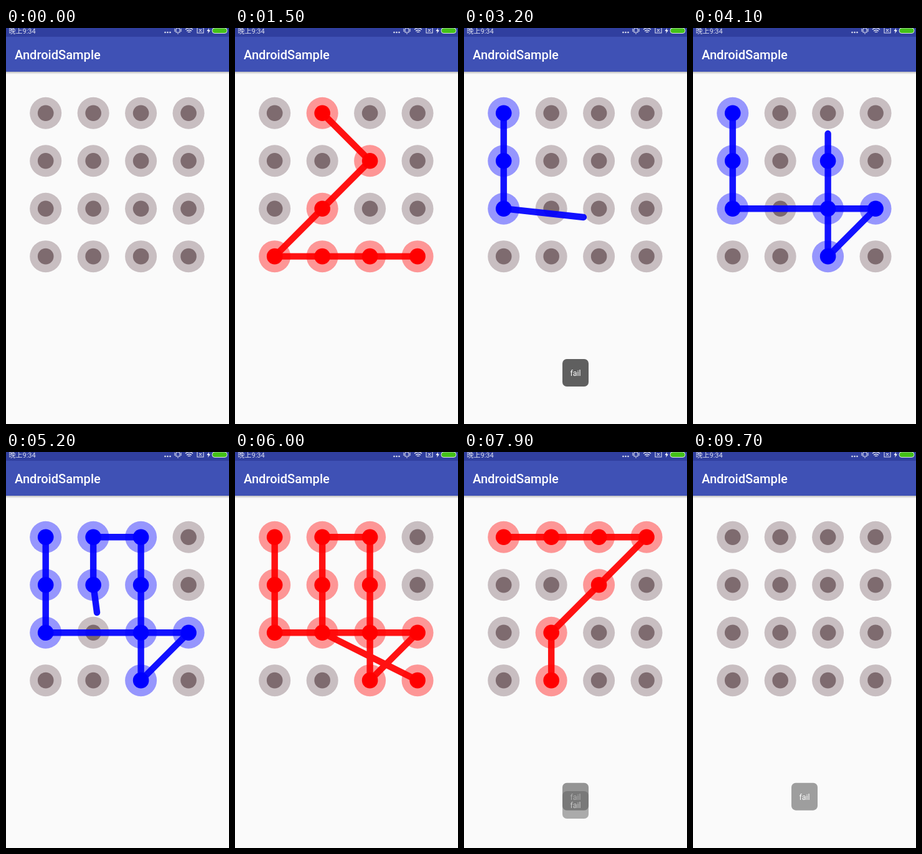
An HTML page for the animation above (9.8 s loop, 358 by 634 pixels).

```html
<!DOCTYPE html>
<html lang="en">
<head>
<meta charset="utf-8">
<title>Pattern lock</title>
<style>
  html, body { margin: 0; height: 100%; overflow: hidden; background: #fafafa; }
  svg { display: block; width: 358px; height: 634px; font-family: Roboto, "Noto Sans CJK SC", "Noto Sans CJK", sans-serif; }
</style>
</head>
<body>
<svg viewBox="0 0 358 634">
  <defs>
    <linearGradient id="shade" x2="0" y2="1">
      <stop stop-color="#000" stop-opacity=".25"/>
      <stop offset="1" stop-color="#000" stop-opacity="0"/>
    </linearGradient>
  </defs>
  <rect width="358" height="634" fill="#fafafa"/>
  <rect y="70" width="358" height="4" fill="url(#shade)"/>
  <rect width="358" height="70" fill="#3f51b5"/>
  <rect width="358" height="14" fill="#303f9f"/>
  <text x="14" y="50" font-size="20.1" font-weight="500" fill="#fff">AndroidSample</text>
  <text x="4.5" y="8.5" font-size="11" fill="#dde0f0">晚上9:34</text>
  <g fill="none" stroke="#dde0f0" stroke-width="1.1">
    <path d="M255.5 7h.01M259.5 7h.01M263.5 7h.01" stroke-width="2.6" stroke-linecap="round"/>
    <path d="M273 7V3q0-3 3-3t3 3v4zM275 9h2M271 1v5M281 1v5"/>
    <path d="M288 2.5q6-5 12 0M290 5q4-3.5 8 0M292 7q2-1.6 4 0" stroke-width="1.3"/>
    <path d="M307 0v8h10V0M310 2l4 4M314 2l-4 4"/>
  </g>
  <path d="M326 0l-3.5 5h2.5l-1 4 4-5.5h-2.5z" fill="#fff"/>
  <rect x="331" y="0" width="24" height="8.5" rx="4" fill="#43c117" stroke="#dde0f0"/>
  <g id="dots"></g>
  <polyline id="trail" fill="none" stroke-width="10.4" stroke-opacity=".93" stroke-linecap="round" stroke-linejoin="round"/>
  <g id="toasts"></g>
</svg>
<script>
const LOOP = 9800, STEP = 100, SIZE = 4, GAP = 76.45, HIT = 0.3;
const TOAST_LIFE = 1812, TOAST_IN = 320, TOAST_OUT = 200;
const RED = { outer: '#fd9696', inner: '#ff0000' };
const BLUE = { outer: '#9696fd', inner: '#0000ff' };
const GREY = { outer: '#c8bec1', inner: '#7e6b6f' };

// Each path holds the turning points of the finger: [time, column, row].
const strokes = [
  { fail: 1500, toast: 1581, end: 2400,
    path: [[1000, 1, 0], [1100, 2, 1], [1250, 0, 3], [1400, 3, 3]] },
  { fail: 6000, toast: 6018, end: 6900,
    path: [[2980, 0, 0], [3100, 0, 2], [3140, .4, 2.45], [3200, 1.677, 2.18], [3300, 2, 2],
      [3500, 3, 2], [3800, 2, 3], [4150, 2, 0], [4200, 1.35, 0], [4500, 1.35, 0], [4700, 1, 0],
      [5200, 1.077, 1.579], [5300, 1, 2], [5500, 2.65, 2.46], [5800, 3, 3]] },
  { fail: 7600, toast: 7806, end: 8600,
    path: [[7180, 0, 0], [7320, 3, 0], [7440, 1, 2], [7500, 1, 3]] }
];

const clamp = v => Math.min(1, Math.max(0, v));
const place = (col, row) => [63.7 + col * GAP, 136.3 + row * GAP];

function add(parent, tag, attrs) {
  const el = document.createElementNS('http://www.w3.org/2000/svg', tag);
  for (const key in attrs) el.setAttribute(key, attrs[key]);
  return parent.appendChild(el);
}

const trail = document.getElementById('trail');
const dotLayer = document.getElementById('dots');
const dots = Array.from({ length: SIZE * SIZE }, (_, i) => {
  const [cx, cy] = place(i % SIZE, Math.floor(i / SIZE));
  return {
    outer: add(dotLayer, 'circle', { cx, cy, r: 25.5 }),
    inner: add(dotLayer, 'circle', { cx, cy, r: 12.8 })
  };
});

for (const stroke of strokes) {
  stroke.box = add(document.getElementById('toasts'), 'g', {});
  add(stroke.box, 'rect', { x: 158, y: 530, width: 42, height: 44, rx: 7, fill: '#5f5f5f' });
  add(stroke.box, 'text', { x: 179, y: 557, 'font-size': 12.5, 'text-anchor': 'middle', fill: '#fff' })
    .textContent = 'fail';
}

function fingerAt(path, t) {
  const next = path.findIndex(point => point[0] > t);
  if (next < 0) return path[path.length - 1].slice(1);
  const [t0, c0, r0] = path[next - 1], [t1, c1, r1] = path[next];
  const k = (t - t0) / (t1 - t0);
  return [c0 + (c1 - c0) * k, r0 + (r1 - r0) * k];
}

// Dots the finger has come close to, in the order of contact.
function touchedDots(path, t) {
  const touched = new Set();
  for (let time = path[0][0]; time <= t; time += 5) {
    const [col, row] = fingerAt(path, time);
    const c = Math.round(col), r = Math.round(row);
    if (Math.hypot(col - c, row - r) < HIT) touched.add(r * SIZE + c);
  }
  return touched;
}

function drawStroke(t) {
  const stroke = strokes.find(s => t >= s.path[0][0] && t < s.end);
  const failed = stroke && t >= stroke.fail;
  const touched = stroke ? touchedDots(stroke.path, Math.min(t, stroke.fail)) : new Set();
  const points = [...touched].map(i => place(i % SIZE, Math.floor(i / SIZE)));
  if (stroke && !failed) points.push(place(...fingerAt(stroke.path, t)));

  const active = failed ? RED : BLUE;
  dots.forEach((dot, i) => {
    const colors = touched.has(i) ? active : GREY;
    dot.outer.setAttribute('fill', colors.outer);
    dot.inner.setAttribute('fill', colors.inner);
  });
  trail.setAttribute('points', points.join(' '));
  trail.setAttribute('stroke', active.inner);
}

function drawToast({ box, toast }, t) {
  const hidden = (1 - clamp((t - toast) / TOAST_IN)) ** 2;
  const gone = clamp((t - toast - TOAST_LIFE) / TOAST_OUT);
  box.setAttribute('opacity', (1 - hidden) * (1 - gone));
  box.setAttribute('transform', `translate(0 ${26 * hidden - 12 * gone ** 4})`);
}

function frame() {
  const t = Math.floor(performance.now() % LOOP / STEP) * STEP;
  drawStroke(t);
  strokes.forEach(stroke => drawToast(stroke, t));
  requestAnimationFrame(frame);
}
frame();
</script>
</body>
</html>
```
